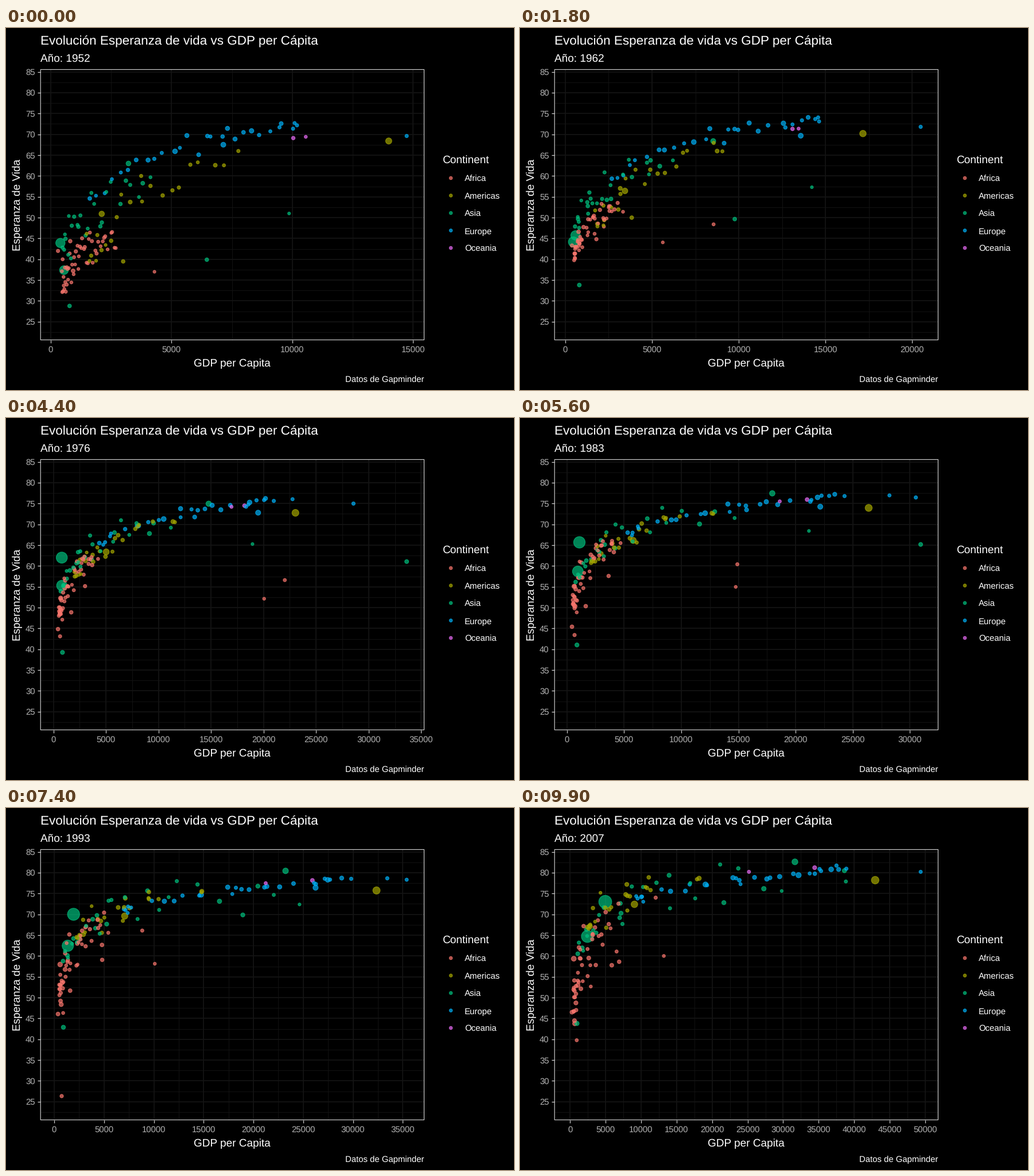
These frames come from a looping animation (885 px wide and 632 px high, 10000 ms). A matplotlib script:

```python
import numpy as np
import matplotlib.pyplot as plt
from matplotlib.animation import FuncAnimation
from matplotlib.collections import LineCollection
from matplotlib.colors import to_rgba
from matplotlib.patches import Rectangle

W, H, DPI = 885, 632, 128
PX = 72 / DPI                 # points per pixel
STEPS = 100
LEFT, RIGHT, TOP, BOTTOM = 60.2, 728.4, 72.5, 544.5
Y_LOW, Y_HIGH = 20.649, 85.553
TEXT, MUTED, LINE, GRID = "white", "#b3b3b3", "#cccccc", "#141414"
SMALL, MEDIUM, LARGE = 14.9, 19.0, 22.45
ALPHA, STROKE = 0.7, 1.18
MAX_POP = 1319

COLORS = {"Africa": "#f8766d", "Americas": "#a3a500", "Asia": "#00bf7d",
          "Europe": "#00b0f6", "Oceania": "#e76bf3"}
POP_GROWTH = {"Africa": 3.6, "Americas": 2.0, "Asia": 2.37,
              "Europe": 1.3, "Oceania": 2.2}

rng = np.random.default_rng(11)
T = np.linspace(0, 1, STEPS)
nations = []


def grow(start, end, pace=1):
    """Geometric growth; a pace below 1 grows early, above 1 late."""
    return start * (end / start) ** (T ** pace)


def ease(start, end, power=None):
    """Ease out; the lower the start, the stronger the early gain."""
    power = power or 1 + max(0, 70 - start) / 40
    return end - (end - start) * (1 - T) ** power


def bump(center, width):
    return np.exp(-((T - center) / width) ** 2 / 2)


def keys(*points):
    return np.interp(T, *zip(*points))


def add(continent, people, gdp, life):
    pop = ease(people / POP_GROWTH[continent], people, 1)
    nations.append((continent, pop, gdp, life))


def crowd(continent, count, spread, gdp_first, gdp_last, life_first, life_last,
          pace=0.8, even=False, setback=0):
    """Nations ranked by wealth; ranks drift and set GDP and life alike."""
    def wobble(rank):
        return 1 - abs(1 - abs(rank + spread * rng.normal()))

    def place(rank, gdp, life):
        low, high = gdp
        wealth = low + (high - low) * rank if even else low * (high / low) ** rank
        rank = np.log(wealth / low) / np.log(high / low)
        return wealth, life[0] + (life[1] - life[0]) * wobble(rank)

    late = np.clip((T - 0.6) / 0.4, 0, 1)
    for k in range(count):
        rank = (k + rng.random()) / count
        g0, l0 = place(rank, gdp_first, life_first)
        g1, l1 = place(wobble(rank), gdp_last, life_last)
        loss = setback * rng.random() * late
        add(continent, 9 * np.exp(0.9 * rng.normal()), grow(g0, g1, pace),
            ease(l0, l1) - loss)


# Landmarks
add("Asia", 1319, grow(400, 4959, 1.6), ease(44, 73) - 8 * bump(0.18, 0.06))
add("Asia", 1110, grow(547, 2452, 1.7), ease(37.4, 64.7))
add("Asia", 127, grow(3217, 31656, 0.5), ease(63, 82.6, 1.6))
add("Asia", 32, grow(779, 975), ease(28.8, 43.8))
add("Asia", 0.7, grow(9867, 29796, 0.65), ease(51, 75.6))
add("Americas", 301, grow(13990, 42952), ease(68.4, 78.2, 1))
add("Americas", 190, grow(2109, 9066, 0.64), ease(50.9, 72.4))
add("Europe", 82, grow(7144, 32170, 0.5), ease(67.5, 79.4, 1))
add("Oceania", 20, grow(10040, 34435, 0.9), ease(69.1, 81.2, 1))
add("Oceania", 4, grow(10557, 25185, 0.75), ease(69.4, 80.2, 1))

# Oil booms, one sharp fall in life expectancy
add("Asia", 28, ease(6460, 21655, 1) + 21500 * bump(0.48, 0.11), ease(39.9, 72.8))
add("Africa", 6, grow(2388, 12057) + 18000 * bump(0.4, 0.14), ease(42.7, 74, 1))
add("Africa", 1.5, grow(4293, 13206) + 13000 * bump(0.45, 0.1), ease(37, 60))
add("Africa", 9, grow(493, 863), ease(40, 47, 1) - 20 * bump(0.727, 0.06))

# Richest and poorest, which set the range of the x axis
add("Europe", 7.5, keys((0, 14734), (0.18, 20431), (0.27, 22966), (0.36, 27195),
                        (1, 37506)), ease(69.6, 81.7, 1))
add("Europe", 4.6, keys((0, 10095), (0.36, 18965), (0.64, 31541), (0.73, 33966),
                        (0.82, 41283), (1, 49357)), ease(72.7, 80.2, 1))
add("Africa", 20, keys((0, 300), (0.18, 390), (0.56, 455), (1, 278)), ease(42, 46.5))

crowd("Africa", 48, 0.25, (460, 2700), (480, 7000), (32, 47), (52, 74), setback=13)
crowd("Americas", 23, 0.15, (1400, 8000), (2200, 19000), (39, 66), (66, 79))
crowd("Asia", 26, 0.16, (470, 4500), (950, 40000), (38, 64), (60, 82), pace=1)
crowd("Europe", 27, 0.06, (1500, 10500), (7000, 40000), (54, 73), (72, 81),
      pace=0.75, even=True)

nations.sort(key=lambda n: -n[1][-1])
names, *series = zip(*nations)
pop, gdp, life = map(np.array, series)


def marker_area(size):
    diameter = (size * 2.845 + 0.945) * 1.25
    return (diameter * PX) ** 2


areas = marker_area(1 + 5 * np.sqrt(pop / MAX_POP))


def y_pixel(value):
    return BOTTOM - (value - Y_LOW) / (Y_HIGH - Y_LOW) * (BOTTOM - TOP)


plt.rcParams["font.family"] = "Liberation Sans"
plt.rcParams["text.hinting"] = "none"
fig = plt.figure(figsize=(W / DPI, H / DPI), dpi=DPI, facecolor="black")
ax = fig.add_axes([0, 0, 1, 1])
ax.set(xlim=(0, W), ylim=(H, 0))
ax.axis("off")


def label(x, y, text, size, color=TEXT, ha="left", **kw):
    return ax.text(x, y, text, fontsize=size * PX, color=color, ha=ha,
                   va="baseline", **kw)


def lines(color, width, z, segments=()):
    group = LineCollection(segments, colors=color, linewidths=width * PX, zorder=z)
    return ax.add_collection(group, autolim=False)


def dots(x, y, area, continents):
    rgba = [to_rgba(COLORS[c], ALPHA) for c in continents]
    return ax.scatter(x, y, s=area, facecolors=rgba, edgecolors=rgba,
                      linewidths=STROKE * PX, zorder=3)


def rows(values, left, right):
    return [[(left, y_pixel(v)), (right, y_pixel(v))] for v in values]


label(60, 28, "Evolución Esperanza de vida vs GDP per Cápita", LARGE)
year_text = label(60, 59, "", MEDIUM)
label((LEFT + RIGHT) / 2, 591, "GDP per Capita", MEDIUM, ha="center")
label(25, 308.5, "Esperanza de Vida", MEDIUM, ha="center", rotation=90,
      rotation_mode="anchor")
label(728.4, 618, "Datos de Gapminder", SMALL, ha="right")

# Fixed horizontal grid and y axis
y_breaks = np.arange(25, 86, 5)
lines(GRID, 0.9, 1, rows(np.arange(22.5, 85, 5), LEFT, RIGHT))
lines(GRID, 1.78, 1, rows(y_breaks, LEFT, RIGHT))
lines(LINE, 1.3, 4, rows(y_breaks, LEFT - 5, LEFT))
for v in y_breaks:
    label(50.7, y_pixel(v) + 5.4, str(v), SMALL, MUTED, "right")
ax.add_patch(Rectangle((LEFT, TOP), RIGHT - LEFT, BOTTOM - TOP, fill=False,
                       edgecolor=LINE, linewidth=1.2 * PX, snap=False, zorder=4))

# Legend
label(760, 236, "Continent", MEDIUM)
legend_y = 262 + 30.5 * np.arange(len(COLORS))
dots(np.full(len(COLORS), 775), legend_y, marker_area(1.2), COLORS)
for y, name in zip(legend_y, COLORS):
    label(799, y + 6, name, SMALL)

# Parts that follow the moving x range
x_breaks = np.arange(0, 50001, 5000)
x_minor = lines(GRID, 0.9, 1)
x_major = lines(GRID, 1.78, 1)
x_ticks = lines(LINE, 1.3, 4)
x_labels = [label(0, 565.4, str(v), SMALL, MUTED, "center") for v in x_breaks]
points = dots(gdp[:, 0], life[:, 0], areas[:, 0], names)


def update(i):
    low, high = gdp[:, i].min(), gdp[:, i].max()
    pad = 0.05 * (high - low)
    low, high = low - pad, high + pad

    def x_pixel(value):
        return LEFT + (value - low) / (high - low) * (RIGHT - LEFT)

    def columns(values, top, bottom):
        return [[(x_pixel(v), top), (x_pixel(v), bottom)]
                for v in values if low <= v <= high]

    x_minor.set_segments(columns(x_breaks + 2500, TOP, BOTTOM))
    x_major.set_segments(columns(x_breaks, TOP, BOTTOM))
    x_ticks.set_segments(columns(x_breaks, BOTTOM, BOTTOM + 5))
    for v, text in zip(x_breaks, x_labels):
        text.set_x(x_pixel(v))
        text.set_visible(v <= high)
    points.set_offsets(np.column_stack([x_pixel(gdp[:, i]), y_pixel(life[:, i])]))
    points.set_sizes(areas[:, i])
    year_text.set_text(f"Año: {round(1952 + 55 * T[i])}")
    return points, x_minor, x_major, x_ticks, year_text, *x_labels


anim = FuncAnimation(fig, update, frames=STEPS, interval=100, repeat=True,
                     repeat_delay=0, blit=False)
plt.show()
```
